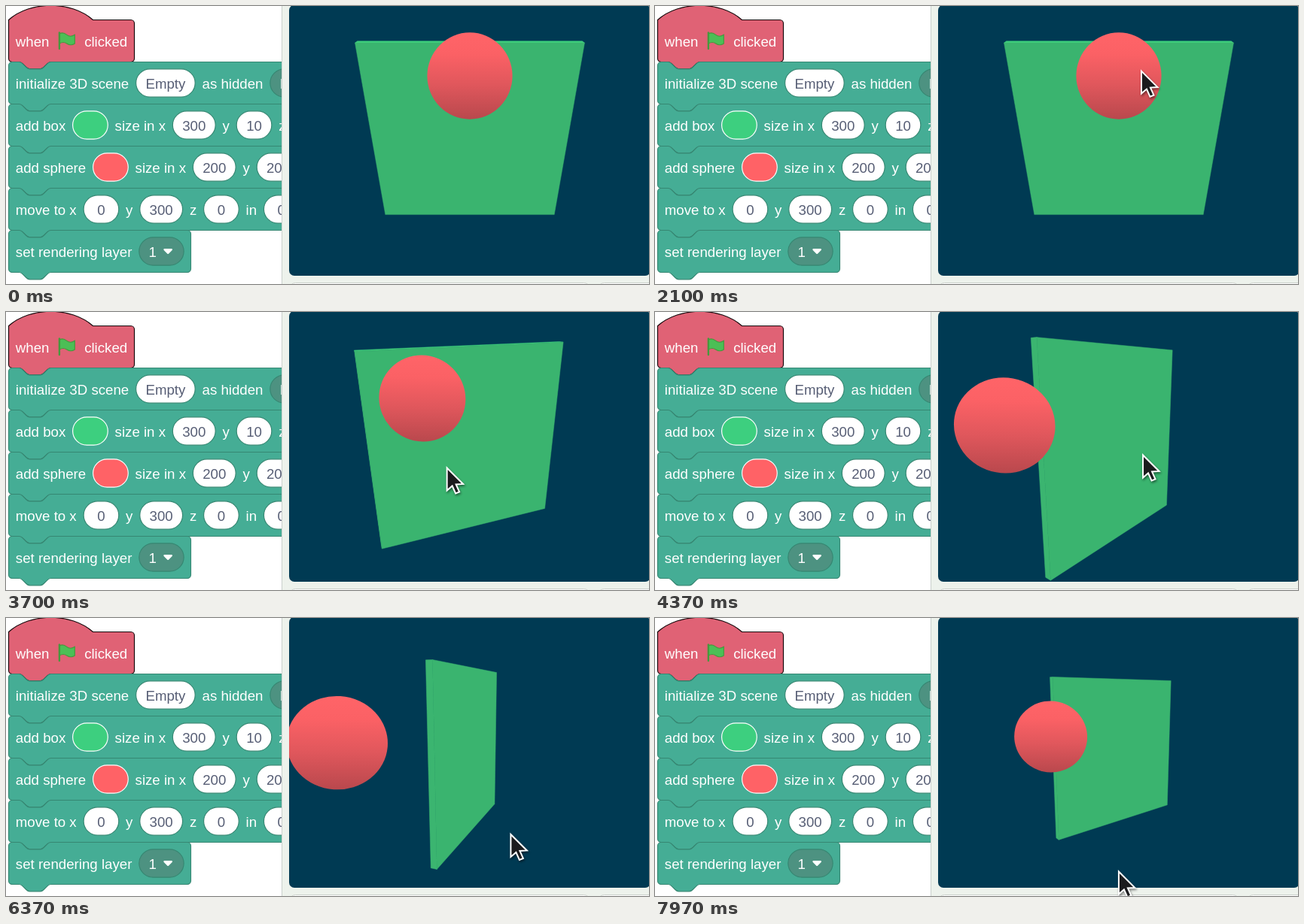
An HTML page that plays this animation: 854 px wide and 370 px high, repeating every 8 s.

```html
<!DOCTYPE html>
<html lang="en">
<head>
<meta charset="utf-8">
<title>3D scene blocks</title>
<style>
  html, body { margin: 0; width: 100%; height: 100%; overflow: hidden; background: #fff; }
  svg { display: block; }
  text { font: 16px "Liberation Sans", Arial, sans-serif; fill: #fff; }
  .value { fill: #575e75; }
  .block { fill: #45ad95; stroke: #368772; }
  .hat { fill: #e06275; stroke: #16080b; }
  .input { fill: #fff; stroke: #368772; }
  .menu { fill: #4d9281; stroke: #368772; }
  .swatch { stroke: #fff; }
  .panel { fill: #fff; stroke: #cbd0cb; }
  #cursor { filter: drop-shadow(1px 2px 1.5px #0007); }
</style>
</head>
<body>
<svg width="854" height="370" viewBox="0 0 854 370">
  <defs>
    <clipPath id="stageClip"><rect x="376" y="-1.4" width="480" height="360.4" rx="7"/></clipPath>
    <linearGradient id="shade" x2="0" y2="1">
      <stop stop-color="#ff6468"/>
      <stop offset=".25" stop-color="#fb6165"/>
      <stop offset=".6" stop-color="#e0575c"/>
      <stop offset="1" stop-color="#b9484d"/>
    </linearGradient>
  </defs>
  <g id="blocks" transform="translate(3.5 18.5) scale(1.1667)"></g>
  <rect x="366" y="-1" width="490" height="373" fill="#edf2ec"/>
  <path d="M366.5 0V370" stroke="#c9cfcc"/>
  <rect class="panel" x="376.5" y="368.5" width="399" height="30" rx="8"/>
  <rect class="panel" x="786.5" y="368.5" width="90" height="30" rx="8"/>
  <g clip-path="url(#stageClip)">
    <rect x="376" y="-2" width="480" height="362" fill="#003a53"/>
    <g id="slab" stroke-width=".5"></g>
    <ellipse id="ball" fill="url(#shade)"/>
  </g>
  <path id="cursor" d="M0 1.500v30l7-6 4.500 10 5-2-4.500-10 9.500-.5z" fill="#1b1b1d" stroke="#fff" stroke-width="2"/>
</svg>
<script>
const $ = id => document.getElementById(id);

// ---- Block stack: every row flows left to right with a fixed gap ----
const ROW = 48, GAP = 8, PAD = 11, PILL = 32, MIN_PILL = 40;
const pen = document.createElement('canvas').getContext('2d');
pen.font = '16px "Liberation Sans", Arial, sans-serif';
const widthOf = text => pen.measureText(text).width;

const textAt = (x, text, cls = '') => `<text class="${cls}" x="${x}" y="30.200">${text}</text>`;
const pillAt = (x, width, cls, fill = '') =>
  `<rect class="${cls}" x="${x}" y="8" width="${width}" height="${PILL}" rx="${PILL / 2}" ${fill && `fill="${fill}"`}/>`;

// Each part knows its width and how to draw itself at x.
const label = text => ({ width: widthOf(text), draw: x => textAt(x, text) });
const swatch = color => ({ width: MIN_PILL, draw: x => pillAt(x, MIN_PILL, 'swatch', color) });
function input(text) {
  const width = Math.max(MIN_PILL, widthOf(text) + 2 * PAD);
  return { width, draw: x => pillAt(x, width, 'input') + textAt(x + (width - widthOf(text)) / 2, text, 'value') };
}
function menu(text) {
  const width = widthOf(text) + 2 * PAD + 20;
  const arrow = x => `<path d="M${x} 22h8l-4 4z" fill="#fff" stroke="#fff" stroke-width="2" stroke-linejoin="round"/>`;
  return { width, draw: x => pillAt(x, width, 'menu') + textAt(x + PAD, text) + arrow(x + width - 22) };
}
const flag = {
  width: 24,
  draw: x => `<g transform="translate(${x} 12)" stroke="#45993d" stroke-linecap="round">
    <path d="M3.500 4c3-2 6-1 8.500 1s6 2 9 0v10c-3 2-6 2-9 0s-5-2-8.500 0z" fill="#4cbf56"/>
    <path d="M3.500 2.500V21" stroke-width="2"/></g>`
};

const NOTCH = 'H12c2 0 3 1 4 2l4 4c1 1 2 2 4 2h12c2 0 3-1 4-2l4-4c1-1 2-2 4-2';
const TAB = 'H48c-2 0-3 1-4 2l-4 4c-1 1-2 2-4 2h-12c-2 0-3-1-4-2l-4-4c-1-1-2-2-4-2H4a4 4 0 0 1-4-4';

function drawRow(parts, row) {
  let x = GAP, content = '';
  for (const part of parts.map(p => typeof p === 'string' ? label(p) : p)) {
    content += part.draw(x);
    x += part.width + GAP;
  }
  const top = row ? 'M0 4a4 4 0 0 1 4-4' + NOTCH : 'M0 0c25-22 71-22 96 0';
  return `<g transform="translate(0 ${row * ROW})"><path class="${row ? 'block' : 'hat'}"
    d="${top}H${x - 4}a4 4 0 0 1 4 4V${ROW - 4}a4 4 0 0 1-4 4${TAB}Z"/>${content}</g>`;
}

$('blocks').innerHTML = [
  ['when', flag, 'clicked'],
  ['initialize 3D scene', input('Empty'), 'as hidden', menu('L')],
  ['add box', swatch('#3dcf7f'), 'size in x', input('300'), 'y', input('10'), 'z'],
  ['add sphere', swatch('#ff6266'), 'size in x', input('200'), 'y', input('200')],
  ['move to x', input('0'), 'y', input('300'), 'z', input('0'), 'in', input('0')],
  ['set rendering layer', menu('1')]
].map(drawRow).join('');

// ---- Pointer: a smooth path through a few stops [time, x, y] ----
const SHOW = 200;
const STOPS = [
  [SHOW, 246, 42], [750, 142, 330], [1030, 160, 323], [1400, 570, 158], [1600, 570, 158],
  [1900, 590, 72], [2100, 646, 85], [2720, 538, 222], [2908, 546, 230.5], [3175, 557, 222],
  [4005, 607, 197.5], [4370, 648, 189], [4700, 667, 186], [5740, 667, 186],
  [6750, 672, 333], [6930, 672, 333], [7020, 682, 336], [7970, 616, 336], [8400, 582, 336]
];
const slope = (i, c) => (STOPS[i + 1][c] - STOPS[i][c]) / (STOPS[i + 1][0] - STOPS[i][0]);

// Harmonic mean of the neighbouring slopes; flat at turning points, so nothing overshoots.
function tangent(i, c) {
  if (i === 0 || i === STOPS.length - 1) return 0;
  const a = slope(i - 1, c), b = slope(i, c);
  return a * b > 0 ? 2 * a * b / (a + b) : 0;
}

function pointer(t) {
  t = Math.max(t, SHOW);
  const i = STOPS.findIndex(stop => stop[0] > t) - 1;
  const span = STOPS[i + 1][0] - STOPS[i][0], s = (t - STOPS[i][0]) / span;
  return [1, 2].map(c => STOPS[i][c] + span * (
    slope(i, c) * s * s * (3 - 2 * s) +
    s * (1 - s) * (tangent(i, c) * (1 - s) - tangent(i + 1, c) * s)));
}

// The view trails the pointer a little while a drag lasts.
const LAG = 125, TURN = .536, ZOOM = 1.19;
function drag(t, from, to) {
  const start = pointer(from), now = pointer(Math.min(Math.max(t - LAG, from), to));
  return [now[0] - start[0], now[1] - start[1]];
}

// ---- 3D view: x right, y up, z away from the camera ----
const FOCAL = 424.5, CX = 616, CY = 178.6, RADIUS = 100, LIFT = 300, DISTANCE = 497, PITCH = 30;
const HALF = [150, 150, 5];
const FACES = [
  { axis: 0, side: -1, color: '#3bb570' },
  { axis: 1, side: 1, color: '#3ecf7c' },
  { axis: 2, side: -1, color: '#3ab46f' }
];
const dot = (a, b) => a[0] * b[0] + a[1] * b[1] + a[2] * b[2];
const project = ([x, y, z]) => `${CX + FOCAL * x / z},${CY - FOCAL * y / z}`;

function drawSlab(axes, dist) {
  const point = amounts => [0, 1, 2].map(c =>
    amounts.reduce((sum, amount, k) => sum + amount * axes[k][c], c === 2 ? dist : 0));
  $('slab').innerHTML = FACES.map(({ axis, side, color }) => {
    const p = (axis + 1) % 3, q = (axis + 2) % 3;
    const corners = [[-1, -1], [1, -1], [1, 1], [-1, 1]].map(([a, b]) => {
      const amounts = [];
      amounts[axis] = side * HALF[axis];
      amounts[p] = a * HALF[p];
      amounts[q] = b * HALF[q];
      return point(amounts);
    });
    if (side * dot(axes[axis], corners[0]) >= 0) return '';
    return `<polygon points="${corners.map(project).join(' ')}" fill="${color}" stroke="${color}"/>`;
  }).join('');
}

// A sphere in perspective is an ellipse stretched away from the view centre.
function drawBall(normal, dist) {
  const [x, y, z] = [normal[0] * LIFT, normal[1] * LIFT, normal[2] * LIFT + dist];
  const depth = z * z - RADIUS * RADIUS;
  const tilt = Math.atan2(-y, x) * 180 / Math.PI;
  const ball = $('ball');
  ball.setAttribute('rx', FOCAL * RADIUS * Math.sqrt(x * x + y * y + depth) / depth);
  ball.setAttribute('ry', FOCAL * RADIUS / Math.sqrt(depth));
  ball.setAttribute('transform', `translate(${project([x, y, depth / z])}) rotate(${tilt})`);
  $('shade').setAttribute('gradientTransform', `rotate(${-tilt} .5 .5)`);
}

function draw(t) {
  const orbit = drag(t, 2720, 5000), zoom = drag(t, 5740, 6900), swing = drag(t, 7020, 8000);
  const yaw = TURN * (orbit[0] + swing[0]) * Math.PI / 180;
  const pitch = (PITCH + TURN * (orbit[1] + swing[1])) * Math.PI / 180;
  const dist = DISTANCE + ZOOM * zoom[1];
  const [ca, sa, cb, sb] = [Math.cos(yaw), Math.sin(yaw), Math.cos(pitch), Math.sin(pitch)];
  const axes = [[ca, sb * sa, cb * sa], [0, cb, -sb], [-sa, sb * ca, cb * ca]];
  drawSlab(axes, dist);
  drawBall(axes[2], dist);
  $('cursor').setAttribute('transform', `translate(${pointer(t)})`);
  $('cursor').style.visibility = t < SHOW ? 'hidden' : 'visible';
}

function tick() {
  draw(performance.now() % 8000);
  requestAnimationFrame(tick);
}
tick();
</script>
</body>
</html>
```
